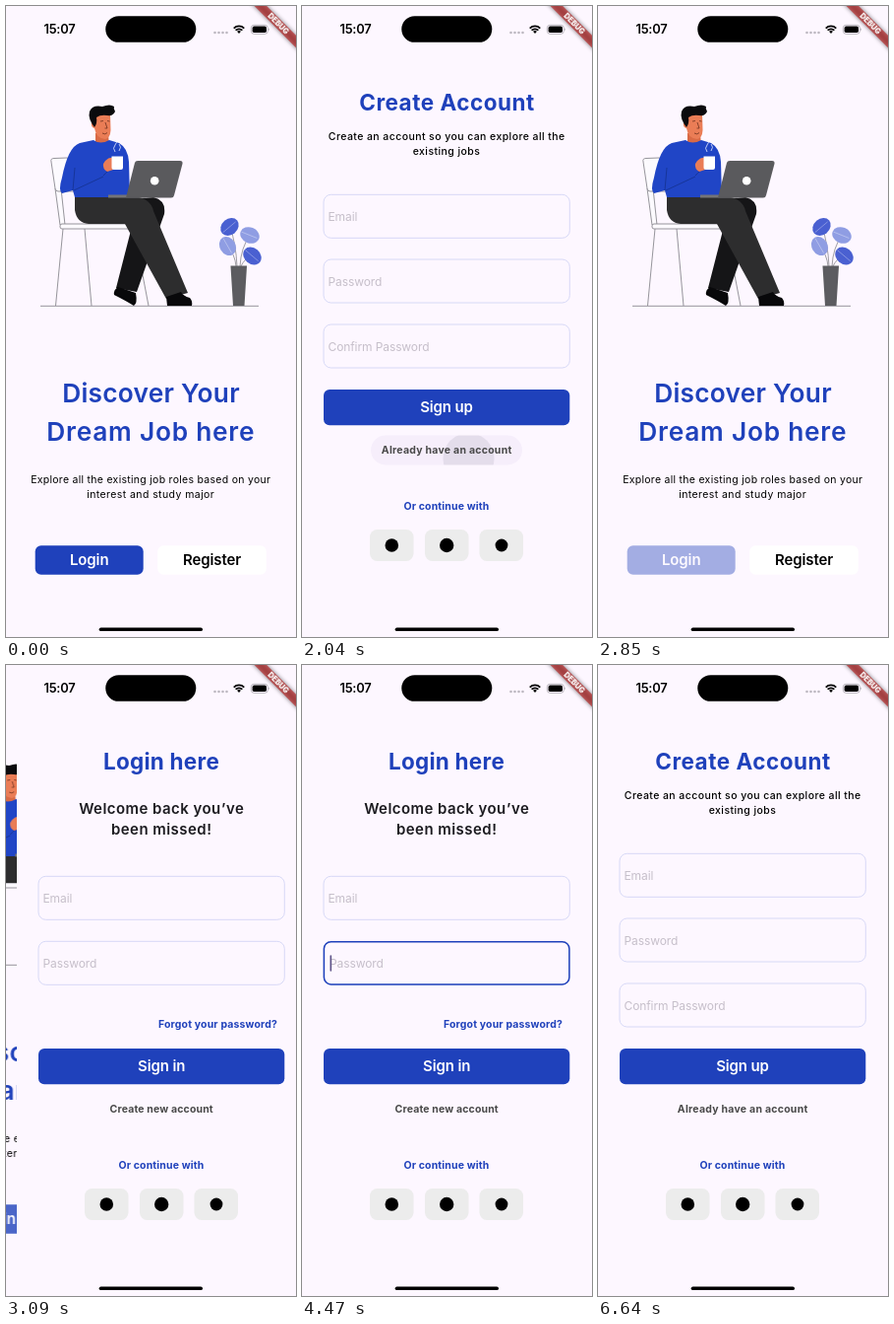
An HTML page that plays this animation: 295 by 640 pixels, repeating every 8 s.

```html
<!DOCTYPE html>
<html lang="en">
<head>
<meta charset="utf-8">
<title>Job app sign-in flow</title>
<style>
html, body { margin: 0; width: 100%; height: 100%; overflow: hidden; background: #fdf7ff; }
svg { display: block; width: 295px; height: 640px; }
text { font-family: Inter, "Open Sans", sans-serif; font-optical-sizing: none; stroke: none; }
.mid { text-anchor: middle; }
.hero { font-size: 26.3px; font-weight: 600; fill: #1f41bb; }
.title { font-size: 22.5px; font-weight: 700; fill: #1f41bb; letter-spacing: .25px; }
.body { font-size: 10.5px; fill: #000; letter-spacing: .28px; }
.loose { letter-spacing: .42px; }
.lead { font-size: 15px; font-weight: 600; fill: #1c1b20; letter-spacing: .45px; }
.btn { font-size: 15px; font-weight: 600; letter-spacing: -.12px; }
.link { font-size: 10.5px; font-weight: 700; fill: #494949; letter-spacing: .15px; }
.blue { fill: #1f41bb; }
.hint { font-size: 12px; fill: #c6bfca; letter-spacing: -.1px; }
.bg { fill: #fdf7ff; }
.field { fill: #fdf7ff; stroke: #d3d5f5; stroke-width: .9; }
.active .field { stroke: #1f41bb; stroke-width: 1.5; }
.caret { fill: #5d5288; }
.pill { fill: #5a3c96; fill-opacity: .045; }
.ink { fill: #46465f; fill-opacity: .1; }

.anim { animation: 8s step-end infinite; }
.hide { opacity: 0; }
#welcome { animation-name: welcome; }
#login { animation-name: login; transform: translateX(295px); }
#signup { animation-name: signup; transform: translateX(295px); }
#loginBtn { animation-name: pressLogin; }
#registerBtn { animation-name: pressRegister; }
#mailFocus { animation-name: mailFocus; }
#passFocus { animation-name: passFocus; }
#passCaret { animation-name: blink; }
#haveInk { animation-name: haveInk; }
#newInk { animation-name: newInk; }
#newSpot { animation-name: spread; transform-origin: 154px 454px; }

@keyframes welcome {
  0%, 30.5% { transform: none; }
  26.875% { transform: translateX(-12px); }
  28.5% { transform: translateX(-4px); }
  37.125% { transform: translateX(-86px); }
  38.625%, 100% { transform: translateX(-94.7px); }
}
@keyframes login {
  0% { transform: translateX(295px); }
  37.125% { transform: translateX(36px); }
  38.625% { transform: translateX(11px); }
  40.25% { transform: translateX(3px); }
  41.75% { transform: none; }
  81.625%, 100% { transform: translateX(-86px); }
}
@keyframes signup {
  0%, 30.5% { transform: translateX(295px); }
  11.125%, 83%, 100% { transform: none; }
  26.875% { transform: translateX(259px); }
  28.5% { transform: translateX(283px); }
  81.625% { transform: translateX(36px); }
}
@keyframes pressRegister {
  0%, 11.125%, 100% { opacity: 1; }
  6.25% { opacity: .4; }
}
@keyframes pressLogin {
  0%, 40.25%, 100% { opacity: 1; }
  35.625% { opacity: .4; }
  37.125% { opacity: .55; }
  38.625% { opacity: .8; }
}
@keyframes mailFocus { 0%, 55.875%, 100% { opacity: 0; } 48.625% { opacity: 1; } }
@keyframes passFocus { 0% { opacity: 0; } 55.875%, 100% { opacity: 1; } }
@keyframes blink {
  0%, 68.875% { opacity: 1; }
  64.25%, 78.5%, 100% { opacity: 0; }
  67.625%, 77.125% { opacity: .5; }
}
@keyframes haveInk { 0%, 26.875%, 100% { opacity: 0; } 25.5% { opacity: 1; } }
@keyframes newInk { 0%, 83%, 100% { opacity: 0; } 77.125% { opacity: 1; } }
@keyframes spread { 0% { transform: scale(.55); } 78.5%, 100% { transform: none; } }
</style>
</head>
<body>
<svg viewBox="0 0 295 640" xmlns="http://www.w3.org/2000/svg">
  <defs>
    <rect id="page" class="bg" width="295" height="640"/>
    <rect id="box" x="22" width="250.3" height="44" rx="7.5"/>
    <rect id="focusBox" x="22.4" y=".4" width="249.5" height="43.2" rx="7.1"/>
    <rect id="wide" x="22" y="389" width="250.3" height="36.3" rx="6" fill="#1f41bb"/>
    <g id="social">
      <text class="link blue mid" x="147" y="511">Or continue with</text>
      <g fill="#ececec">
        <rect x="69" y="531" width="44.5" height="32" rx="7.5"/>
        <rect x="125" y="531" width="44.5" height="32" rx="7.5"/>
        <rect x="180.5" y="531" width="44.5" height="32" rx="7.5"/>
      </g>
      <circle cx="91.3" cy="547" r="6.8"/>
      <circle cx="147.2" cy="547" r="7.2"/>
      <circle cx="203" cy="547" r="6.4"/>
    </g>
    <g id="leaf">
      <ellipse rx="10" ry="8"/>
      <path d="M-9 0H8" stroke="#fff" stroke-opacity=".5" stroke-width=".6"/>
    </g>
    <clipPath id="haveClip"><rect x="70" y="435.5" width="154" height="30" rx="15"/></clipPath>
    <clipPath id="newClip"><rect x="84" y="435.5" width="125" height="30" rx="15"/></clipPath>
    <filter id="soft" x="-20%" y="-100%" width="140%" height="300%">
      <feGaussianBlur stdDeviation="2"/>
    </filter>
  </defs>

  <g id="welcome" class="anim">
    <use href="#page"/>
    <path d="M35 304.3H257" stroke="#8d8b92" stroke-width=".9"/>

    <!-- chair -->
    <g fill="#fcfafe" stroke="#8b8990" stroke-width=".9" stroke-linejoin="round">
      <path d="M58 226 50.5 304M80 226 87 304M130 226 145 304" fill="none"/>
      <path d="M50 185 55 222H60L56 185Z"/>
      <path d="M46 158Q45 154.5 49 154.5L62 154Q65 154 66 157L71 188H53Q50.5 188 50 185Z"/>
      <rect x="55" y="221" width="77" height="5" rx="2"/>
    </g>

    <!-- legs -->
    <path d="M128 196 150 194Q163 197 161 211L133 290 112 286 130 216Z" fill="#151517"/>
    <path d="M114 285 132 291Q134 302 130 304Q122 299 110 293Q109 288 114 285Z" fill="#08080a"/>
    <path d="M70 193H128Q147 194 150 208L185 291 163 297 121 221H84Q72 220 70 207Z" fill="#2d2d2e"/>
    <path d="M163 295 178 290Q180 294 187 296Q190 299 189 304H164Z" fill="#08080a"/>

    <!-- torso and head -->
    <path d="M91 129 91 143 105 142 104 129Z" fill="#d96a45"/>
    <path d="M89 136Q96 141 105 136L115 139Q124 144 125 158L126 194H70L68 187 57 190Q53 187 57 174Q63 143 75 139Z" fill="#2045c6"/>
    <path d="M68 187 70 164M69 187 99 173M105 166Q101 170 99 172" fill="none" stroke="#15318f" stroke-width=".8"/>
    <path d="M88 113Q89 107 97 107L106 110 106.500 126Q106 134 101 135Q92 135 90 124Q86 123 87 118Z" fill="#ea7d56"/>
    <path d="M90 123Q83 114 85 107Q88 100 98 102Q106 99 110 102Q109 104 111 107Q109 112 103 111Q96 110 92 113Q93 119 90 123Z" fill="#0b0b0d"/>
    <path d="M96 117 99 116.500M103 116.500 105.500 117M101 118 103 124H100.500M98 129Q101 131 103 128.500" fill="none" stroke="#70321f" stroke-width=".8"/>
    <path d="M101 157Q105 153 109 154V166L103 168Q98 165 99 160Z" fill="#ea7d56"/>
    <path d="M107.500 152.500H119V164Q119 166 117 166H109.500Q107.500 166 107.500 164Z" fill="#fff"/>
    <path d="M111 148Q108 144 111 141T111 136M115 147Q118 143 115 140" fill="none" stroke="#e9edff" stroke-width=".8"/>

    <!-- laptop -->
    <path d="M104 191.500H138L142 194.500H104Z" fill="#747477"/>
    <path d="M134 157H177Q180 157 179.500 160L171 192Q170.500 194.500 168 194.500H122L131 159Q131.500 157 134 157Z" fill="#5a5a5d"/>
    <circle cx="151.200" cy="177.300" r="4.300" fill="#fff"/>

    <!-- plant -->
    <path d="M235 264Q234 242 228 224M238 264Q239 245 248 233M234 264Q233 252 225 243M239 264Q242 257 250 253" fill="none" stroke="#77777c" stroke-width=".7"/>
    <use href="#leaf" fill="#4a60d1" transform="translate(227.500 224) rotate(-40)"/>
    <use href="#leaf" fill="#8f9de3" transform="translate(248 232.500) rotate(22)"/>
    <use href="#leaf" fill="#8f9de3" transform="translate(225.500 243.500) rotate(60)"/>
    <use href="#leaf" fill="#4a60d1" transform="translate(250.500 253.500) rotate(40)"/>
    <path d="M228.500 263.500H245L242.500 304H231Z" fill="#5c5c60"/>

    <text class="hero mid" x="147.500" y="402" letter-spacing=".25">Discover Your</text>
    <text class="hero mid" x="147.300" y="441" letter-spacing=".75">Dream Job here</text>
    <text class="body mid" x="147.200" y="484">Explore all the existing job roles based on your</text>
    <text class="body loose mid" x="147.200" y="499">interest and study major</text>
    <g id="loginBtn" class="anim">
      <rect x="29.700" y="547.300" width="110" height="29.400" rx="6" fill="#1f41bb"/>
      <text class="btn mid" x="84.700" y="567" fill="#fff">Login</text>
    </g>
    <g id="registerBtn" class="anim">
      <rect x="154.300" y="547.300" width="110.500" height="29.400" rx="6" fill="#fff"/>
      <text class="btn mid" x="209.500" y="567">Register</text>
    </g>
  </g>

  <g id="login" class="anim">
    <use href="#page"/>
    <text class="title mid" x="147" y="105.500">Login here</text>
    <text class="lead mid" x="147.200" y="151">Welcome back you’ve</text>
    <text class="lead mid" x="147.200" y="172">been missed!</text>
    <use href="#box" y="214.300" class="field"/>
    <text class="hint" x="26.500" y="241">Email</text>
    <use href="#box" y="280.300" class="field"/>
    <text class="hint" x="26.500" y="307">Password</text>
    <g id="mailFocus" class="anim active hide">
      <use href="#focusBox" y="214.300" class="field"/>
      <text class="hint" x="28" y="241">Email</text>
      <rect class="caret" x="28.500" y="228.500" width="1.600" height="16.500" rx=".8"/>
    </g>
    <g id="passFocus" class="anim active hide">
      <use href="#box" y="280.300" class="bg"/>
      <use href="#focusBox" y="280.300" class="field"/>
      <text class="hint" x="28" y="307">Password</text>
      <rect id="passCaret" class="anim caret" x="28.500" y="294.300" width="1.600" height="16.500" rx=".8"/>
    </g>
    <text class="link blue" x="144" y="368">Forgot your password?</text>
    <use href="#wide"/>
    <text class="btn mid" x="147.200" y="412" fill="#fff">Sign in</text>
    <g id="newInk" class="anim hide" clip-path="url(#newClip)">
      <rect class="pill" x="84" y="435" width="125" height="31"/>
      <circle id="newSpot" class="anim ink" cx="154" cy="454" r="23"/>
    </g>
    <text class="link mid" x="147.200" y="454">Create new account</text>
    <use href="#social"/>
  </g>

  <g id="signup" class="anim">
    <use href="#page"/>
    <text class="title mid" x="147.500" y="105.500" style="letter-spacing:.5px">Create Account</text>
    <g font-weight="500">
      <text class="body loose mid" x="147.200" y="136">Create an account so you can explore all the</text>
      <text class="body loose mid" x="147" y="151">existing jobs</text>
    </g>
    <use href="#box" y="191.300" class="field"/>
    <text class="hint" x="26.500" y="217.500">Email</text>
    <use href="#box" y="257" class="field"/>
    <text class="hint" x="26.500" y="283.500">Password</text>
    <use href="#box" y="323" class="field"/>
    <text class="hint" x="26.500" y="349.500">Confirm Password</text>
    <use href="#wide"/>
    <text class="btn mid" x="147" y="412" fill="#fff">Sign up</text>
    <g id="haveInk" class="anim hide" clip-path="url(#haveClip)">
      <rect class="pill" x="70" y="435" width="154" height="31"/>
      <circle class="ink" cx="169.500" cy="459" r="26"/>
    </g>
    <text class="link mid" x="147.200" y="454" style="letter-spacing:.25px">Already have an account</text>
    <use href="#social"/>
  </g>

  <!-- system chrome -->
  <text x="38.500" y="28.300" font-size="12.900" font-weight="600" letter-spacing="-.25">15:07</text>
  <rect x="101.300" y="10.200" width="92" height="26.600" rx="13.300"/>
  <g fill="#bdb8c1">
    <circle cx="212.500" cy="27" r="1.300"/><circle cx="216.500" cy="27" r="1.300"/>
    <circle cx="220.500" cy="27" r="1.300"/><circle cx="224.500" cy="27" r="1.300"/>
  </g>
  <g fill="none" stroke="#000" stroke-width="1.700">
    <path d="M231.700 22.600A7.600 7.600 0 0 1 242.300 22.600M233.600 24.700A4.800 4.800 0 0 1 240.400 24.700"/>
    <path d="M235 25.800Q237 24.400 239 25.800L237 28Z" fill="#000" stroke="none"/>
  </g>
  <rect x="249.300" y="19.300" width="17" height="9" rx="3" fill="none" stroke="#a6a2aa" stroke-width=".8"/>
  <rect x="250.600" y="20.600" width="14.400" height="6.400" rx="1.800"/>
  <path d="M267.300 22.300Q269 23.800 267.300 25.300Z" fill="#a6a2aa"/>
  <rect x="94.700" y="630.400" width="105.300" height="3.700" rx="1.850"/>
  <g transform="translate(295) rotate(45)">
    <rect x="-36" y="21" width="72" height="9" fill-opacity=".5" filter="url(#soft)"/>
    <rect x="-36" y="21" width="72" height="9" fill="#b71c1c" fill-opacity=".63"/>
    <text class="mid" y="28.200" font-size="7.600" font-weight="900" fill="#fff">DEBUG</text>
  </g>
</svg>
</body>
</html>
```
